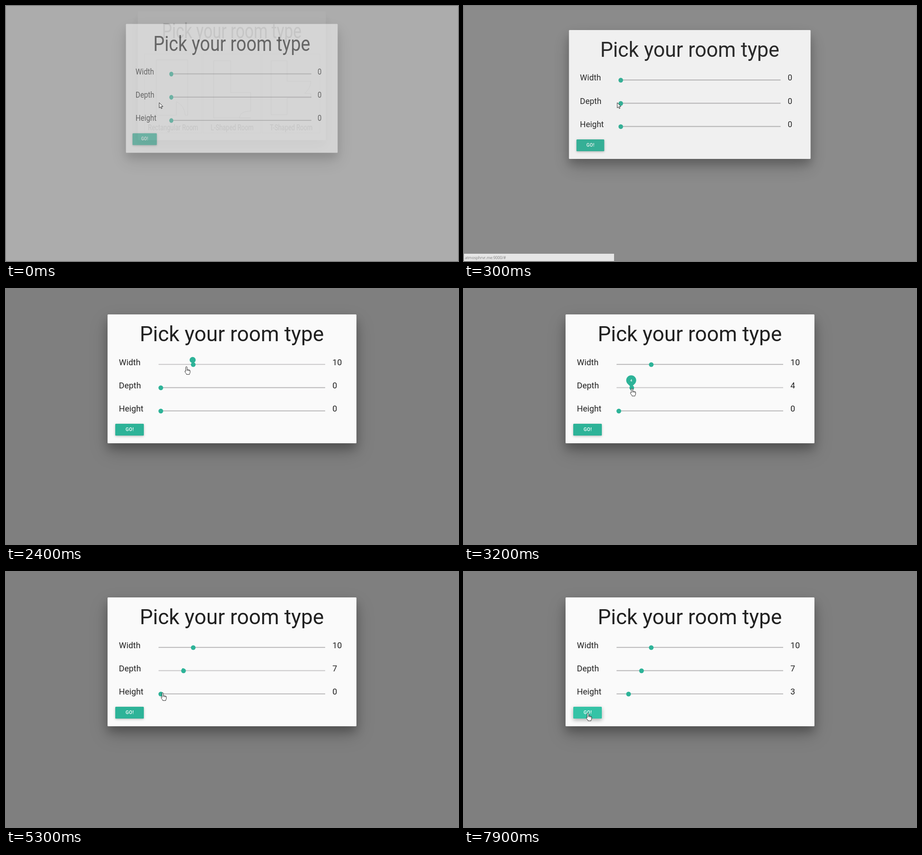
These frames come from a looping animation (997x562 px, 8 s). An HTML page:

```html
<!DOCTYPE html>
<html lang="en">
<head>
<meta charset="utf-8">
<title>Room picker</title>
<style>
  html, body { margin: 0; width: 100%; height: 100%; overflow: hidden; background: #fff; }
  #stage { position: relative; width: 997px; height: 562px; overflow: hidden; font-family: Roboto, sans-serif; }
  .veil { position: absolute; inset: 0; background: #000; }
  .modal {
    position: absolute; left: 224.3px; top: 56.2px; width: 548.4px; height: 284px;
    border-radius: 1.5px; background: #fafafa; transform-origin: 50% 0;
    box-shadow: 0 11.7px 20.4px rgba(0,0,0,.22), 0 18px 40px rgba(0,0,0,.21);
  }
  .modal svg { position: absolute; left: -224.3px; top: -56.2px; }
  svg { position: absolute; left: 0; top: 0; overflow: visible; }
  text { fill: #212121; font-size: 18.5px; }
  .title { font-size: 46.1px; text-anchor: middle; }
  .room { font-size: 17.8px; text-anchor: middle; }
  .plan { fill: none; stroke: #777; }
  .card { fill: none; stroke: #000; stroke-opacity: .1; stroke-width: 2; }
  .teal { fill: #2db398; }
  .pinText { fill: #fff; font-size: 7.3px; font-weight: 500; text-anchor: middle; }
  #go {
    position: absolute; left: 17.2px; top: 240.5px; width: 63px; height: 26.2px; border-radius: 1.5px;
    color: #fff; font: 500 10.5px/26.4px Roboto, sans-serif; letter-spacing: .35px; text-align: center;
  }
  #status {
    position: absolute; left: 0; top: 546px; width: 331px; height: 16px; padding-left: 2px; box-sizing: border-box;
    background: #e6e6e6; color: #7f7f7f; font: 8.4px/17px "Open Sans", sans-serif;
  }
</style>
</head>
<body>
<div id="stage">
  <div class="veil" id="oldVeil"></div>
  <div class="modal" id="oldModal">
    <svg width="997" height="562" id="rooms">
      <text class="title" x="498" y="115.3">Pick your room type</text>
    </svg>
  </div>
  <div class="veil" id="veil"></div>
  <div class="modal" id="modal">
    <div id="go">GO!</div>
    <svg width="997" height="562" id="form">
      <text class="title" x="498" y="115.3">Pick your room type</text>
    </svg>
  </div>
  <div id="status">atmosphrvr.me:9000/#</div>
  <svg width="997" height="562">
    <g id="cursor" fill="#fff" stroke="#111" stroke-width=".9" stroke-linejoin="round">
      <path id="arrow" d="M0 0V11.6L2.7 9.1 4.4 13.2 6.2 12.4 4.5 8.5H8.2Z"/>
      <g id="hand">
        <path d="M-1.6 9.5V1.4a1.5 1.5 0 0 1 3 0V6.5q1.3-1 2.4.2q1.3-.6 2.2.6q2-.2 2 1.8v3q0 2.2-1.4 3.6v1.3h-6.6v-1.2q-1.6-1.4-3.2-4.4q-.8-1.4 0-2q1-.4 1.6.7z"/>
        <path fill="none" d="M1.4 6.5v2.6M3.8 6.9v2.4M6 7.5v2"/>
      </g>
    </g>
  </svg>
</div>
<script>
const LOOP = 8000, STEP = 100;
const ORIGIN = 341.5, UNIT = 7.15;
const $ = id => document.getElementById(id);
const clamp = (v, lo = 0, hi = 1) => Math.min(hi, Math.max(lo, v));
const mix = (a, b, p) => a + (b - a) * p;
const easeOut = (x, power) => 1 - (1 - clamp(x)) ** power;
const smooth = x => x * x * (3 - 2 * x);

function add(parent, tag, attrs, text = "") {
  const node = document.createElementNS("http://www.w3.org/2000/svg", tag);
  for (const key in attrs) node.setAttribute(key, attrs[key]);
  node.textContent = text;
  $(parent).append(node);
  return node;
}

// Floor plans on the dialog that is closing.
const plans = {
  "Rectangular": "M278 163h91.5v122h-7q-3-22-26-30v30H278z",
  "L-Shaped": "M445 165h50v70h58v41q-32 0-32 15h32H445z",
  "T-Shaped": "M612.5 165H659v45h69.5q0 14-18 27h18v10H659v37h-46.5z"
};
Object.keys(plans).forEach((name, i) => {
  const x = 327 + 172 * i;
  add("rooms", "rect", { class: "card", x: x - 84, y: 150, width: 168, height: 174 });
  add("rooms", "path", { class: "plan", d: plans[name] });
  add("rooms", "text", { class: "room", x, y: 318.5 }, name + " Room");
});

function makeSlider(label, row, start, end) {
  const y = 166.2 + 51.2 * row;
  add("form", "text", { x: 249, y: y + 1.3 }, label);
  return {
    y, start, end,
    track: add("form", "rect", { x: 336.5, y: y - 1, width: 367.5, height: 2 }),
    thumb: add("form", "circle", { class: "teal", cy: y + .4, r: 5.2 }),
    pin: add("form", "path", { class: "teal" }),
    pinText: add("form", "text", { class: "pinText" }),
    value: add("form", "text", { x: 720, y: y + 1.3 })
  };
}

const sliders = [
  makeSlider("Width", 0, 950, 2250),
  makeSlider("Depth", 1, 2750, 5050),
  makeSlider("Height", 2, 5400, 6250)
];

// Pointer position that sets a slider to a value.
const grip = (row, value) => [ORIGIN + .5 + UNIT * value, sliders[row].y + (row ? 1.5 : -8)];
const HOME = [338, 213], BUTTON = [273.5, 311], BELOW = [271, 344];

// Each move: start, end, destination.
const moves = [
  [300, 900, grip(0, 0)], [1000, 1400, grip(0, 11)], [1850, 2100, grip(0, 10)],
  [2250, 2750, grip(1, 0)], [2800, 3200, grip(1, 4)], [3200, 4700, grip(1, 7)],
  [5050, 5350, grip(2, 0)], [5450, 5900, grip(2, 3)],
  [6200, 6430, BUTTON], [7050, 7400, BELOW], [7450, 7750, BUTTON]
];

function pointer(t) {
  let pos = HOME;
  for (const [start, end, goal] of moves) {
    const p = smooth(clamp((t - start) / (end - start)));
    pos = pos.map((v, i) => mix(v, goal[i], p));
  }
  return pos;
}

function overButton(t) {
  const [x, y] = pointer(t);
  return x > 241 && x < 305 && y > 296 && y < 323;
}

function overSlider(t) {
  const [x, y] = pointer(t);
  return sliders.some(s => t >= s.start && t < s.end || x > 340 && x < 704 && Math.abs(y - s.y) < 6);
}

const PIN = "M0 15.5L-7.8 7.8A11 11 0 1 1 7.8 7.8Z";
const DISC = "M-11 0a11 11 0 1 1 22 0a11 11 0 1 1 -22 0Z";

function drawSlider(s, t) {
  const held = t >= s.start && t < s.end;
  const [x] = pointer(clamp(t, s.start, s.end - 80));
  const value = t < s.start ? 0 : Math.max(0, Math.round((x - ORIGIN - .5) / UNIT));
  const size = t < s.start ? 0
    : held ? easeOut((t - s.start) / 350, 3)
    : 1 - smooth(clamp((t - s.end) / 350));
  const pinX = x - 1.8, pinY = s.y - 16.2 * size;

  s.track.setAttribute("fill", size > 0 ? "#c9c7c9" : "#b8b7b8");
  s.thumb.setAttribute("cx", ORIGIN + UNIT * value);
  s.value.textContent = value;
  s.pin.setAttribute("d", held ? PIN : DISC);
  s.pin.setAttribute("transform", `translate(${pinX} ${pinY}) scale(${size})`);
  s.pinText.textContent = held && size > .6 ? value : "";
  s.pinText.setAttribute("x", pinX);
  s.pinText.setAttribute("y", pinY + 2.8);
}

function placeModal(modal, veil, shown, top) {
  modal.style.opacity = shown;
  modal.style.transform = `translateY(${top - 56.2}px) scaleX(${.7 + .3 * shown})`;
  veil.style.opacity = shown / 2;
}

// The hover tint is the share of the last quarter second spent on the button.
function drawButton(t) {
  let h = 0;
  for (let ago = 0; ago < 250; ago += 50) h += overButton(t - ago) / 5;
  const go = $("go").style;
  go.background = `rgb(${mix(45, 52, h)}, ${mix(179, 195, h)}, ${mix(152, 166, h)})`;
  go.boxShadow = `0 ${mix(1.5, 3.6, h)}px ${mix(3.6, 8, h)}px rgba(0,0,0,${mix(.16, .18, h)}),` +
    `0 ${mix(1.5, 3, h)}px ${mix(7.3, 11, h)}px rgba(0,0,0,${mix(.12, .15, h)})`;
}

function drawCursor(t) {
  const hand = overButton(t) || overSlider(t);
  $("cursor").setAttribute("transform", `translate(${pointer(t)})`);
  $("hand").style.display = hand ? "" : "none";
  $("arrow").style.display = hand ? "none" : "";
}

function draw(t) {
  const leaving = 1 - easeOut(.34 + t / 500, 4);
  const shown = easeOut((t + 186) / 885, 3);
  placeModal($("oldModal"), $("oldVeil"), leaving, 1.3 + 56.2 * leaving);
  placeModal($("modal"), $("veil"), shown, mix(22.5, 56.2, shown));
  sliders.forEach(s => drawSlider(s, t));
  drawButton(t);
  $("status").style.opacity = clamp(t / 200) * clamp((800 - t) / 300);
  drawCursor(t);
}

const began = performance.now();
function tick() {
  const t = (performance.now() - began) % LOOP;
  draw(Math.floor(t / STEP) * STEP);
  requestAnimationFrame(tick);
}
tick();
</script>
</body>
</html>
```
